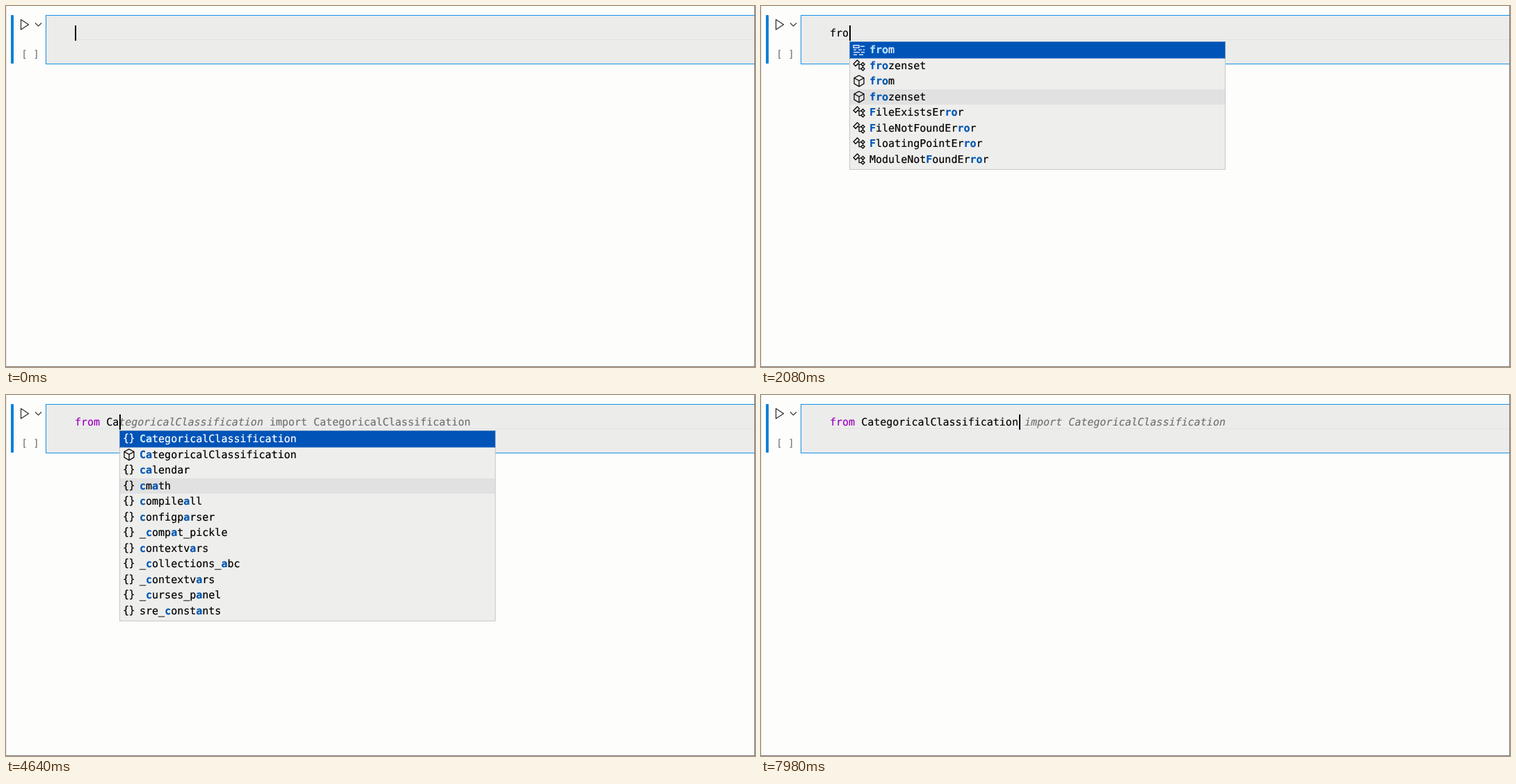
These frames come from a looping animation (1077 px wide and 520 px high, 8 s). An HTML page:

```html
<!DOCTYPE html>
<html lang="en">
<head>
<meta charset="utf-8">
<title>Notebook autocomplete</title>
<style>
  html, body { margin: 0; width: 100%; height: 100%; overflow: hidden; background: #fdfdfc; }
  #stage { position: relative; width: 1077px; height: 520px; overflow: hidden; background: #fdfdfc;
    font: 15px/22.5px "DejaVu Sans Mono", "Liberation Mono", monospace;
    text-rendering: geometricPrecision; }
  #stage > * { position: absolute; box-sizing: border-box; }
  #frame { inset: 0; border: solid #77777c; border-width: 0 1px 1px 0; box-shadow: inset 1px 0 #e8e8e8; }
  #bar { left: 7px; top: 13px; width: 4px; height: 70px; border-radius: 1px; background: #0d80d6; }
  #cell { left: 57px; top: 13px; width: 1020px; height: 71px; background: #ececeb;
    border: 1px solid #1490e8; border-right: 0; }
  #rule { left: 99px; top: 48px; width: 977px; height: 1px; background: #e3e3e6; }
  #gutter { left: 0; top: 0; fill: none; stroke: #333; stroke-width: 1.3; }
  #count { left: 22.3px; top: 59px; font-size: 14px; color: #666; white-space: pre; }
  #line { left: 99px; top: 28px; white-space: pre; color: #000; -webkit-text-stroke: .15px; }
  #line .key { color: #9b00bd; }
  #line .ghost { color: #707070; }
  #caret { top: 28px; width: 2px; height: 22px; background: #000; }
  #list { top: 51px; width: 541px; padding-bottom: 3px; background: #eeeeed; border: 1px solid #c8c8c8;
    -webkit-text-stroke: .2px; }
  .row { position: relative; height: 22.5px; padding-left: 28px; white-space: pre; color: #000; }
  .row svg { position: absolute; left: 4px; top: 2px; width: 18px; height: 18px;
    fill: none; stroke: currentColor; stroke-width: 1.25; }
  .row em { position: absolute; left: 4px; top: -1px; font-style: normal; letter-spacing: -.6px; }
  .row b { color: #0057b3; }
  .row.hover { background: #e1e1e1; }
  .row.on { background: #0054b8; color: #fff; outline: 1px solid #0054b880; }
  .row.on b { color: #bbe4ff; }
</style>
</head>
<body>
<div id="stage">
  <div id="bar"></div>
  <div id="cell"></div>
  <div id="rule"></div>
  <svg id="gutter" width="57" height="84">
    <path d="M21.5 19.5V34L32.5 26.7Z" stroke-linejoin="round"/>
    <path d="M42 24.5L46.5 29L51 24.5" stroke-width="1.1"/>
  </svg>
  <div id="count">[ ]</div>
  <div id="line"></div>
  <div id="frame"></div>
  <div id="list"></div>
  <div id="caret"></div>
</div>
<script>
const LOOP = 8000, CHAR = 9.03, LEFT = 99;
const $ = id => document.getElementById(id);
const svg = d => `<svg viewBox="0 0 18 18"><path d="${d}"/></svg>`;

const icons = {
  k: svg("M1 2.5H9V6H1ZM11 4H17M1 9H5M8 9H13M15 9H17M1 12.5H10M12 12.5H17M1 16H6M9 16H15"),
  c: svg("M1 6.5L6.5 1L9.5 4L4 9.5ZM7.5 7H12M9 7V13.5H12M12 7L14.5 4.5L17 7L14.5 9.5ZM12 13.5L14.5 11L17 13.5L14.5 16Z"),
  v: svg("M9 1L16 4.7V12.8L9 17L2 12.8V4.7ZM2 4.7L9 8.5L16 4.7M9 8.5V17"),
  m: "<em>{}</em>"
};

// Each entry starts with its icon key; brackets mark the matched letters.
const lists = {
  f: "k[f]inally k[f]or k[f]rom c[f]ilter c[f]loat v[f]ormat c[f]rozenset v[f]rom v[f]rozenset c[F]ileExistsError c[F]ileNotFoundError c[F]loatingPointError",
  fr: "k[fr]om c[fr]ozenset v[fr]om v[fr]ozenset k[f]o[r] c[f]ilte[r] v[f]o[r]mat c[F]ileExistsE[r]ror c[F]ileNotFoundE[r]ror c[F]loatingPointE[r]ror c[F]utureWa[r]ning cModuleNot[F]oundE[r]ror",
  fro: "k[fro]m c[fro]zenset v[fro]m v[fro]zenset c[F]ileExistsEr[ro]r c[F]ileNotFoundEr[ro]r c[F]loatingPointEr[ro]r cModuleNot[F]oundEr[ro]r",
  from: "k[from] v[from]",
  C: "m[C]ategoricalClassification v[C]ategoricalClassification m[c]alendar m[c]math m[c]md m[c]ode m[c]odecs m[c]odeop m[c]ollections m[c]olorsys m[c]ompileall m[c]onfigparser",
  Ca: "m[Ca]tegoricalClassification v[Ca]tegoricalClassification m[ca]lendar m[c]m[a]th m[c]ompile[a]ll m[c]onfigp[a]rser m_[c]omp[a]t_pickle m[c]ontextv[a]rs m_[c]ollections_[a]bc m_[c]ontextv[a]rs m_[c]urses_p[a]nel msre_[c]onst[a]nts"
};
const module = "CategoricalClassification";
for (const n of [3, 4, 5]) {
  const label = `[${module.slice(0, n)}]${module.slice(n)}`;
  lists[module.slice(0, n)] = `m${label} v${label}`;
}

const tail = " import " + module;
const typed = (at, n) => ({
  at, text: "from " + module.slice(0, n), list: module.slice(0, n),
  ghost: module.slice(n), plain: tail
});

const steps = [
  { at: 0, text: "" },
  { at: 20, text: "", off: true },
  { at: 1340, text: "f", list: "f" },
  { at: 1620, text: "fr", list: "fr" },
  { at: 1880, text: "fro", list: "fro" },
  { at: 2260, text: "from", list: "from" },
  { at: 2600, text: "from " },
  { at: 3200, text: "from ", ghost: "sklearn.model_selection import train_test_split" },
  typed(4060, 1),
  typed(4620, 2),
  typed(4820, 3),
  typed(5020, 4),
  typed(5220, 5),
  { at: 7300, text: "from " + module, ghost: tail }
];

function row(entry, i, all) {
  const label = entry.slice(1).replace(/\[/g, "<b>").replace(/\]/g, "</b>");
  const state = i === 0 ? "on" : i === 3 && all.length > 3 ? "hover" : "";
  return `<div class="row ${state}">${icons[entry[0]]}${label}</div>`;
}

function show({ text, list, ghost = "", plain = "", off }) {
  const end = LEFT + text.length * CHAR;
  const code = text.replace(/^from/, '<span class="key">from</span>');
  // The keyword is coloured only once a space follows it.
  $("line").innerHTML = `${text.includes(" ") ? code : text}<i class="ghost">${ghost}</i><span class="ghost">${plain}</span>`;
  $("caret").style.left = Math.round(end + (text ? .7 : 0)) + "px";
  $("caret").style.visibility = off ? "hidden" : "visible";
  $("list").style.display = list ? "block" : "none";
  $("list").style.left = Math.round(end + .9) + "px";
  $("list").innerHTML = list ? lists[list].split(" ").map(row).join("") : "";
}

let current;
function draw() {
  const t = performance.now() % LOOP;
  const step = steps.findLast(s => s.at <= t);
  if (step !== current) show(current = step);
  requestAnimationFrame(draw);
}
draw();
</script>
</body>
</html>
```
